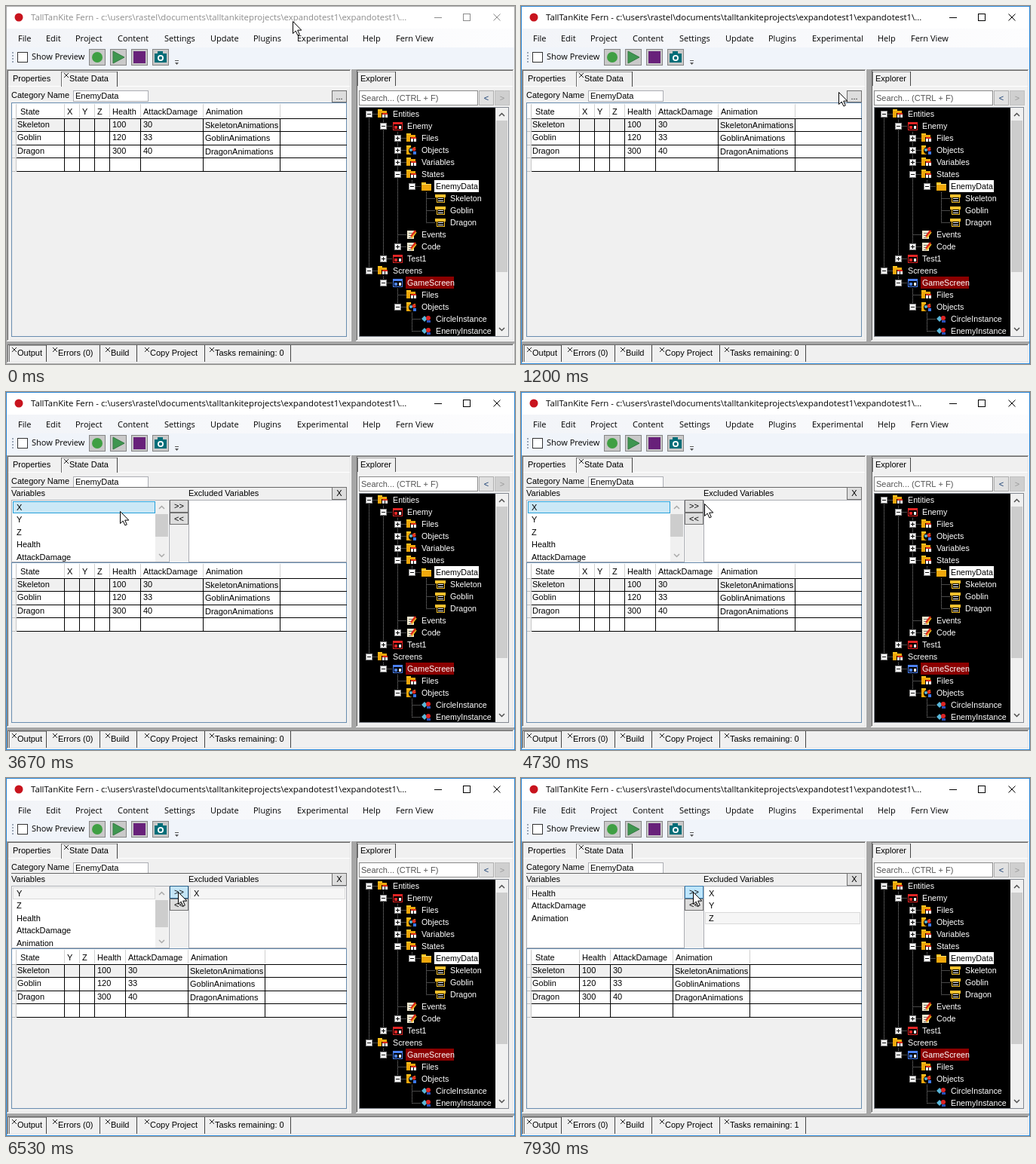
These frames come from a looping animation (675x475 px, 8 s). An HTML page with a canvas:

```html
<!DOCTYPE html>
<html lang="en">
<head>
<meta charset="utf-8">
<title>State editor</title>
<style>
html, body { margin: 0; width: 100%; height: 100%; overflow: hidden; background: #f0f0f0; }
canvas { display: block; }
</style>
</head>
<body>
<canvas id="stage" width="675" height="475"></canvas>
<script>
const g = document.getElementById('stage').getContext('2d');
const SANS = '11px "Liberation Sans", Arial, sans-serif';
const TREE = '10.7px "Liberation Sans", Arial, sans-serif';
const UI = '11px "Open Sans", "Noto Sans", sans-serif';
const TITLE = '11.4px "Open Sans", "Noto Sans", sans-serif';
const LOOP = 8000, FPS = 15;

const VARS = ['X', 'Y', 'Z', 'Health', 'AttackDamage', 'Animation'];
const WIDTHS = { State: 64, X: 20, Y: 20, Z: 20, Health: 41, AttackDamage: 83, Animation: 102 };
const ROWS = [['Skeleton', 100, 30], ['Goblin', 120, 33], ['Dragon', 300, 40]]
  .map(([State, Health, AttackDamage]) => ({ State, Health, AttackDamage, Animation: State + 'Animations' }));

// Level, expander, icon, label
const NODES = [
  [0, '-', 'files', 'Entities'], [1, '-', 'entity', 'Enemy'], [2, '+', 'files', 'Files'],
  [2, '+', 'objects', 'Objects'], [2, '+', 'files', 'Variables'], [2, '-', 'files', 'States'],
  [3, '-', 'folder', 'EnemyData'], [4, '', 'state', 'Skeleton'], [4, '', 'state', 'Goblin'],
  [4, '', 'state', 'Dragon'], [2, '', 'code', 'Events'], [2, '+', 'code', 'Code'],
  [1, '+', 'entity', 'Test1'], [0, '-', 'files', 'Screens'], [1, '-', 'screen', 'GameScreen'],
  [2, '', 'files', 'Files'], [2, '-', 'objects', 'Objects'], [3, '', 'instance', 'CircleInstance'],
  [3, '', 'instance', 'EnemyInstance']
];

// Cursor stops: step, x, y
const PATH = [
  [0, 380, 20], [11, 326, 105], [12, 326, 105], [18, 421, 114], [23, 438, 121], [43, 438, 121],
  [51, 151, 158], [60, 151, 158], [65, 213, 159], [68, 232, 199], [71, 243, 148],
  [73, 232, 151], [75, 228, 151], [120, 228, 151]
];

function rect(x, y, w, h, color) {
  g.fillStyle = color;
  g.fillRect(x, y, w, h);
}

function box(x, y, w, h, fill, line) {
  rect(x, y, w, h, line);
  rect(x + 1, y + 1, w - 2, h - 2, fill);
}

// Panel with a two-pixel sunken edge
function sunken(x, y, w, h) {
  rect(x, y, w, h, '#fff');
  rect(x, y, w - 1, h - 1, '#a0a0a0');
  rect(x + 1, y + 1, w - 2, h - 2, '#e3e3e3');
  rect(x + 1, y + 1, w - 3, h - 3, '#696969');
  rect(x + 2, y + 2, w - 4, h - 4, '#f0f0f0');
}

function text(s, x, mid, color = '#000', font = SANS, align = 'left') {
  g.font = font;
  g.fillStyle = color;
  g.textAlign = align;
  g.fillText(s, x, mid + 4);
}

function shape(points, fill, line, width = 1) {
  g.beginPath();
  points.forEach(([x, y]) => g.lineTo(x, y));
  if (fill) {
    g.closePath();
    g.fillStyle = fill;
    g.fill();
  }
  if (line) {
    g.strokeStyle = line;
    g.lineWidth = width;
    g.stroke();
  }
}

function disc(x, y, r, color) {
  g.fillStyle = color;
  g.beginPath();
  g.arc(x, y, r, 0, 7);
  g.fill();
}

function cross(x, y, size, color) {
  shape([[x, y], [x + size, y + size]], null, color);
  shape([[x + size, y], [x, y + size]], null, color);
}

function chevron(x, y, dir, color) {
  shape([[x - 3.5, y + 2 * dir], [x, y - 1.5 * dir], [x + 3.5, y + 2 * dir]], null, color, 1.5);
}

function cursorAt(step) {
  const i = PATH.findIndex(p => p[0] > step);
  const [s0, x0, y0] = PATH[i - 1], [s1, x1, y1] = PATH[i];
  const u = (step - s0) / (s1 - s0), e = u * u * (3 - 2 * u);
  return { x: Math.round(x0 + (x1 - x0) * e), y: Math.round(y0 + (y1 - y0) * e) };
}

function button(label, x, y, w, h, tip, pressed) {
  const hover = tip.x >= x && tip.x < x + w && tip.y >= y && tip.y < y + h;
  const [fill, line] = pressed ? ['#c4e5f6', '#2c628b'] : hover ? ['#bee6fd', '#3c7fb1'] : ['#ddd', '#707070'];
  box(x, y, w, h, fill, line);
  text(label, x + w / 2, y + 8, '#000', SANS, 'center');
}

function titleBar(active) {
  const ink = active ? '#000' : '#8c8c8c';
  rect(0, 0, 675, 30, '#fff');
  disc(17, 15, 5.5, '#c8141e');
  text('TallTanKite Fern - c:\\users\\rastel\\documents\\talltankiteprojects\\expandotest1\\expandotest1\\...', 33, 15, ink, TITLE);
  rect(568, 15, 10, 1, ink);
  box(606, 10, 10, 10, '#fff', ink);
  cross(646.5, 10.5, 9, ink);

  const shade = g.createLinearGradient(0, 0, 675, 0);
  shade.addColorStop(0, '#f2f4f8');
  shade.addColorStop(1, '#fdfdfe');
  rect(0, 30, 675, 25, shade);
  const menu = { File: 16, Edit: 53, Project: 92, Content: 148, Settings: 210, Update: 271,
    Plugins: 328, Experimental: 386, Help: 473, 'Fern View': 517 };
  for (const name in menu) text(name, menu[name], 43, '#000', UI);
}

function toolBar() {
  rect(0, 55, 675, 30, '#f0f4fa');
  for (let y = 61; y < 76; y += 4) rect(8, y, 2, 2, '#9aa5b5');
  box(15, 61, 14, 14, '#fff', '#333');
  text('Show Preview', 34, 67, '#000', UI);
  for (const x of [110, 138, 166, 194]) box(x, 57, 22, 22, '#c9c9c9', '#858585');
  disc(121, 68, 7, '#3f9f43');
  shape([[142, 60], [157, 68], [142, 76]], '#3f9650', '#347a42');
  rect(169, 60, 16, 16, '#68217a');
  rect(197, 63, 16, 12, '#006d78');
  rect(201, 60, 7, 3, '#006d78');
  disc(205, 69, 4, '#fff');
  disc(205, 69, 2.2, '#006d78');
  rect(224, 72, 5, 1, '#555');
  shape([[224, 75], [229, 75], [226.5, 78]], '#555');
}

function tabFrame(x, y, w, h) {
  rect(x, y, w, 1, '#a0a0a0');
  rect(x, y, 1, h, '#696969');
  rect(x + 1, y + 1, 1, h - 1, '#fff');
  rect(x + w - 1, y, 1, h, '#444');
}

function closable(label, x, mid) {
  cross(x - 7, mid - 7, 6, '#222');
  text(label, x, mid);
}

function panels(tasks) {
  rect(0, 84, 675, 391, '#a6a6a6');
  sunken(1, 84, 457, 361);
  sunken(464, 84, 210, 361);
  sunken(1, 448, 673, 26);

  rect(3, 106, 70, 1, '#fff');
  rect(148, 106, 308, 1, '#fff');
  text('Properties', 9, 96);
  tabFrame(73, 87, 75, 20);
  closable('State Data', 84, 96);
  tabFrame(466, 87, 51, 19);
  rect(517, 106, 155, 1, '#fff');
  text('Explorer', 470, 96);

  tabFrame(4, 450, 50, 22);
  for (const x of [124, 173, 263, 377]) rect(x, 450, 1, 22, '#444');
  closable('Output', 15, 460);
  closable('Errors (0)', 69, 460);
  closable('Build', 139, 460);
  closable('Copy Project', 191, 460);
  closable('Tasks remaining: ' + tasks, 277, 460);
}

function listRow(x, y, w, style) {
  const [fill, line] = { hover: ['#e5f3fb', '#70c0e7'], active: ['#cbe8f6', '#26a0da'], idle: ['#f6f6f6', '#dadada'] }[style];
  box(x, y, w, 16, fill, line);
}

function listItems(items, x) {
  items.slice(0, 5).forEach((s, i) => text(s, x, 153 + Math.floor(16.5 * i)));
}

function variableLists(step, tip, moved, pressed) {
  rect(7, 126, 425, 1, '#666');
  text('Variables', 7, 134);
  text('Excluded Variables', 242, 134);
  button('X', 432, 126, 20, 17, tip);
  box(7, 143, 210, 83, '#fff', '#abadb3');
  box(242, 143, 210, 83, '#fff', '#abadb3');

  const kept = VARS.slice(moved), full = kept.length > 4;
  const over = tip.x > 8 && tip.x < 198 && tip.y >= 145 && tip.y < 161;
  const style = step >= 80 ? 'idle' : step >= 55 ? 'active' : over ? 'hover' : '';
  if (style) listRow(9, 145, full ? 189 : 206, style);
  listItems(kept, 14);
  if (full) {
    rect(198, 144, 17, 81, '#f0f0f0');
    rect(198, 162, 17, Math.round(180 / kept.length), '#cdcdcd');
    chevron(206.5, 153, 1, '#aaa');
    chevron(206.5, 217, -1, '#aaa');
  }
  if (moved) listRow(244, 145 + Math.floor(16.5 * (moved - 1)), 206, 'idle');
  listItems(VARS.slice(0, moved), 249);
  button('>>', 217, 143, 25, 17, tip, pressed);
  button('<<', 217, 160, 25, 16, tip);
}

function table(top, hidden) {
  const cols = ['State', ...VARS.slice(hidden)];
  const lineY = i => top + 19 + Math.floor(17.5 * i);
  box(7, top - 2, 445, 441 - top, '#f0f0f0', '#688caf');
  rect(8, top - 1, 443, 20, '#fff');
  rect(13, lineY(0), 438, 70, '#fff');
  const end = 14 + cols.reduce((sum, c) => sum + WIDTHS[c], 0);
  rect(14, lineY(0), end - 14, 17, '#f0f0f0');
  rect(13, top, 1, 89, '#c8c8c8');
  for (let i = 0; i < 5; i++) {
    rect(8, lineY(i), 5, 1, '#c0c0c0');
    rect(14, lineY(i), 438, 1, '#000');
  }
  let x = 14;
  for (const c of cols) {
    text(c, x + (c === 'State' ? 5 : 3), top + 10);
    ROWS.forEach((row, i) => {
      const dx = c === 'State' ? 1 : c === 'Animation' ? 2 : 3;
      text(row[c] ?? '', x + dx, lineY(i) + (c === 'Animation' ? 9 : 8));
    });
    x += WIDTHS[c];
    rect(x - 1, top, 1, 18, '#d0d0d0');
    rect(x - 1, lineY(0), 1, 71, '#000');
  }
}

const icons = {
  folder(x, y) {
    rect(x - 6, y - 5, 6, 3, '#ffc31e');
    rect(x - 6, y - 3, 13, 9, '#f0a80c');
    rect(x - 6, y - 3, 13, 1, '#ffe070');
  },
  files(x, y) {
    rect(x - 7, y - 6, 6, 3, '#ffc31e');
    rect(x - 7, y - 4, 12, 9, '#f0a80c');
    box(x - 2, y - 1, 9, 7, '#fff', '#000');
    rect(x - 1, y - 1, 7, 2, '#d82818');
    rect(x + 2, y + 1, 1, 4, '#000');
  },
  window(x, y, color) {
    box(x - 6, y - 5, 13, 11, '#000', color);
    rect(x - 6, y - 5, 13, 3, color);
    rect(x - 4, y, 4, 4, color);
    rect(x + 2, y, 3, 4, '#fff');
  },
  entity(x, y) {
    icons.window(x, y, '#e02424');
  },
  screen(x, y) {
    icons.window(x, y, '#4a80f0');
  },
  objects(x, y) {
    rect(x - 7, y - 6, 6, 3, '#ffc31e');
    rect(x - 7, y - 4, 12, 10, '#f0a80c');
    disc(x + 1, y + 1, 5, '#000');
    disc(x + 3, y - 1, 2.5, '#e03020');
    disc(x - 1, y, 2, '#59b6d8');
    rect(x + 2, y + 2, 4, 4, '#3b78e8');
  },
  state(x, y) {
    rect(x - 7, y - 5, 14, 4, '#f4c02c');
    box(x - 5, y - 2, 11, 8, '#000', '#f4c02c');
    rect(x - 3, y, 7, 1, '#fff');
    rect(x - 3, y + 3, 7, 1, '#fff');
  },
  code(x, y) {
    rect(x - 6, y - 5, 9, 11, '#f2ead0');
    for (let i = 0; i < 3; i++) rect(x - 4, y - 2 + i * 3, 5, 1, '#777');
    shape([[x - 1, y + 3], [x + 5, y - 5]], null, '#e02a18', 2.5);
    shape([[x, y + 5], [x + 6, y - 3]], null, '#f4b81c', 1.5);
  },
  instance(x, y) {
    shape([[x - 6, y], [x - 2, y - 4], [x + 2, y], [x - 2, y + 4]], '#59b6d8');
    disc(x + 3, y - 1, 3, '#dc2424');
    rect(x + 1, y + 2, 5, 3, '#2950b8');
  }
};

function tree() {
  box(468, 112, 158, 20, '#fff', '#8a8a8a');
  text('Search... (CTRL + F)', 471, 122, '#555');
  box(627, 112, 20, 20, '#e1e1e1', '#adadad');
  box(648, 112, 20, 20, '#cfcfcf', '#c0c0c0');
  text('<', 637, 122, '#123a70', SANS, 'center');
  text('>', 658, 122, '#999', SANS, 'center');
  box(468, 134, 199, 305, '#000', '#828790');

  const rowY = i => 143 + 16 * i;
  g.setLineDash([1, 1]);
  NODES.forEach(([level], i) => {
    const x = 481.5 + 19 * level, y = rowY(i) + 0.5;
    let up = i;
    while (up > 0 && NODES[up][0] >= level) up--;
    shape([[x, rowY(up) + (level ? 8 : 0)], [x, y]], null, '#909090');
    shape([[x, y], [x + 12, y]], null, '#909090');
  });
  g.setLineDash([]);
  NODES.forEach(([level, sign, icon, label], i) => {
    const x = 481 + 19 * level, y = rowY(i);
    if (sign) {
      box(x - 4, y - 4, 9, 9, '#fff', '#888');
      rect(x - 2, y, 5, 1, '#000');
      if (sign === '+') rect(x, y - 2, 1, 5, '#000');
    }
    icons[icon](x + 19, y);
    const chosen = label === 'EnemyData';
    if (chosen) rect(x + 30, y - 8, 59, 16, '#fff');
    if (label === 'GameScreen') rect(x + 30, y - 8, 64, 16, '#8b0000');
    text(label, x + 32, y, chosen ? '#000' : '#fff', TREE);
  });

  rect(649, 135, 17, 303, '#f0f0f0');
  rect(650, 152, 15, 201, '#cdcdcd');
  chevron(657.5, 144, 1, '#505050');
  chevron(657.5, 429, -1, '#505050');
}

function pointer({ x, y }) {
  const arrow = [[0, 0], [0, 16], [3.7, 12.6], [6.4, 18.4], [8.8, 17.4], [6.2, 11.6], [11.3, 11.6]];
  shape([...arrow, [0, 0]].map(([dx, dy]) => [x + dx + 0.5, y + dy + 0.5]), '#fff', '#000');
}

function draw(ms) {
  const step = Math.floor((ms + 4) * FPS / 1000) % (LOOP * FPS / 1000);
  const count = (...at) => at.filter(s => step >= s).length;
  const within = (a, b) => step >= a && step < b;
  const tip = cursorAt(step);
  const active = step >= 1, open = step >= 35;

  titleBar(active);
  toolBar();
  panels([83, 101, 119].includes(step) ? 1 : 0);
  text('Category Name', 7, 118);
  box(89, 112, 100, 15, '#fff', '#abadb3');
  text('EnemyData', 92, 119);
  if (open) {
    const pressed = within(80, 83) || within(98, 100) || within(115, 118);
    variableLists(step, tip, count(83, 100, 118), pressed);
  } else {
    button('...', 432, 112, 20, 16, tip, step >= 32);
  }
  table(open ? 228 : 130, count(83, 101, 119));
  tree();
  g.strokeStyle = active ? '#2b88d8' : '#aaa';
  g.lineWidth = 1;
  g.strokeRect(0.5, 0.5, 674, 474);
  pointer(tip);
}

const start = performance.now();
function tick() {
  draw((performance.now() - start) % LOOP);
  requestAnimationFrame(tick);
}
tick();
</script>
</body>
</html>
```
